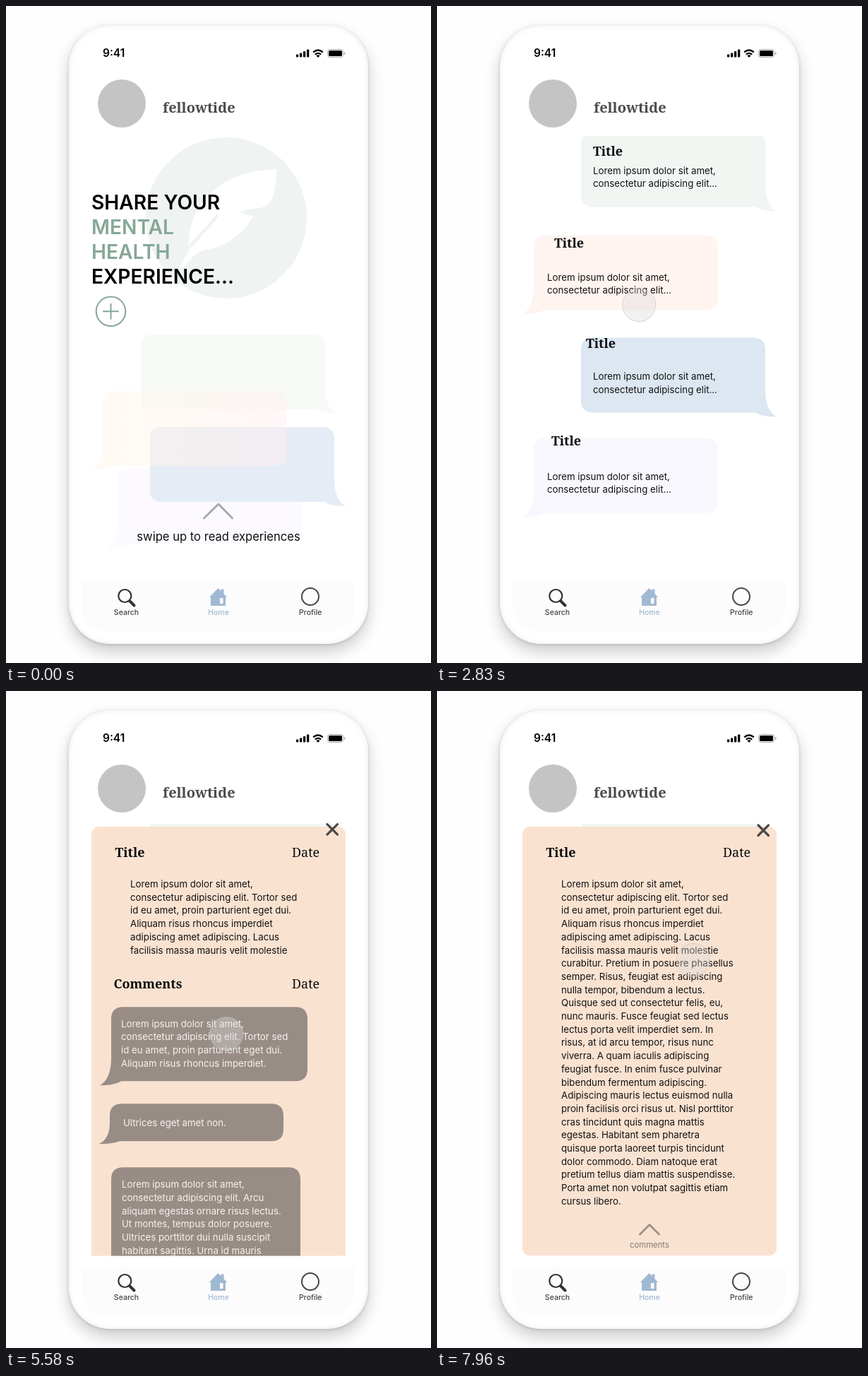
These frames come from a looping animation (602x930 px, 8000 ms). An HTML page:

```html
<!DOCTYPE html>
<html lang="en">
<head>
<meta charset="utf-8">
<title>Shared experiences</title>
<style>
  html, body { margin: 0; width: 100%; height: 100%; overflow: hidden; background: #fefefe; }
  .phone {
    position: absolute; left: 89px; top: 27px; width: 424px; height: 876px;
    border-radius: 58px; background: #fff;
    box-shadow: 0 11px 22px rgba(0,0,0,.2), 0 1px 4px rgba(0,0,0,.14),
      inset 0 0 8px rgba(0,0,0,.08);
  }
  svg { position: absolute; left: 0; top: 0; display: block; }
  text { font-family: Inter, "Open Sans", sans-serif; white-space: pre; }
  .body { font-size: 13.25px; fill: #111; }
  .light { fill: #f7f2ee; }
  .serif { font-family: "Noto Serif", serif; font-size: 18px; fill: #0c0c0c; }
  .bold { font-weight: 700; }
  .head { font-size: 28.2px; font-weight: 600; }
  .nav { font-size: 10.5px; font-weight: 500; text-anchor: middle; fill: #444; }
  .line { fill: none; stroke-linecap: round; stroke-linejoin: round; }
</style>
</head>
<body>
<div class="phone"></div>
<svg id="stage" width="602" height="930" viewBox="0 0 602 930"></svg>
<script>
const LOOP = 8000;
const GREEN = '#86a797', PEACH = '#fae2d1', BROWN = '#988d86', BLUE = '#a0b9d2';
const PITCH = 18.7;

const STORY = `Lorem ipsum dolor sit amet,
consectetur adipiscing elit. Tortor sed
id eu amet, proin parturient eget dui.
Aliquam risus rhoncus imperdiet
adipiscing amet adipiscing. Lacus
facilisis massa mauris velit molestie
curabitur. Pretium in posuere phasellus
semper. Risus, feugiat est adipiscing
nulla tempor, bibendum a lectus.
Quisque sed ut consectetur felis, eu,
nunc mauris. Fusce feugiat sed lectus
lectus porta velit imperdiet sem. In
risus, at id arcu tempor, risus nunc
viverra. A quam iaculis adipiscing
feugiat fusce. In enim fusce pulvinar
bibendum fermentum adipiscing.
Adipiscing mauris lectus euismod nulla
proin facilisis orci risus ut. Nisl porttitor
cras tincidunt quis magna mattis
egestas. Habitant sem pharetra
quisque porta laoreet turpis tincidunt
dolor commodo. Diam natoque erat
pretium tellus diam mattis suspendisse.
Porta amet non volutpat sagittis etiam
cursus libero.`;
const TEASER = 'Lorem ipsum dolor sit amet,\nconsectetur adipiscing elit...';
const REPLIES = [
  `Lorem ipsum dolor sit amet,
consectetur adipiscing elit. Tortor sed
id eu amet, proin parturient eget dui.
Aliquam risus rhoncus imperdiet.`,
  'Ultrices eget amet non.',
  `Lorem ipsum dolor sit amet,
consectetur adipiscing elit. Arcu
aliquam egestas ornare risus lectus.
Ut montes, tempus dolor posuere.
Ultrices porttitor dui nulla suscipit
habitant sagittis. Urna id mauris
volutpat enim nunc ut viverra
elementum, et. Nulla eget enim`
];

const text = (x, y, str, cls, extra = '') =>
  `<text x="${x}" y="${y}" class="${cls}" ${extra}>${str}</text>`;
const lines = (x, y, str, cls = 'body') =>
  str.split('\n').map((s, i) => text(x, y + i * PITCH, s, cls)).join('');
const stroke = (d, color, width, cap = 'round') =>
  `<path class="line" d="${d}" stroke="${color}" stroke-width="${width}" style="stroke-linecap:${cap}"/>`;
const rect = (x, y, w, h, fill, r = 0) =>
  `<rect x="${x}" y="${y}" width="${w}" height="${h}" rx="${r}" fill="${fill}"/>`;
const ring = (x, y, r, color, width) =>
  `<circle cx="${x}" cy="${y}" r="${r}" fill="none" stroke="${color}" stroke-width="${width}"/>`;
const plus = (x, y, r, arm, color, width) => ring(x, y, r, color, width) +
  stroke(`M${x - arm} ${y}h${2 * arm}M${x} ${y - arm}v${2 * arm}`, color, width);

// Speech bubble as one outline, its tail at the lower right or mirrored to the left.
function bubble(x, y, w, h, fill, left, tail = 32, drop = 6) {
  const r = 17;
  const d = `M${r} 0H${w - r}Q${w} 0 ${w} ${r}V${h - tail}
    C${w} ${h - tail * .45} ${w + 5} ${h} ${w + 16} ${h + drop}
    C${w + 5} ${h + drop} ${w - 6} ${h + drop - 1} ${w - 14} ${h}
    H${r}Q0 ${h} 0 ${h - r}V${r}Q0 0 ${r} 0Z`;
  const place = left ? `translate(${x + w} ${y}) scale(-1 1)` : `translate(${x} ${y})`;
  return `<path d="${d}" fill="${fill}" transform="${place}"/>`;
}

// from/to: left and top before and after the swipe, pale/fill: colour before and after,
// title/body: text offsets in the bubble.
const CARDS = [
  { from: [191, 465], to: [204, 349], pale: '#f7faf7', fill: '#f1f6f3', title: [17, 33], body: [17, 59] },
  { from: [158, 655], to: [137, 782], pale: '#fcfaff', fill: '#f9f7fe', title: [25, 10], body: [19, 59], left: true },
  { from: [204, 596], to: [204, 640], pale: '#e5ecf5', fill: '#dde7f1', title: [7, 14], body: [17, 59.5] },
  { from: [137, 545], to: [137, 495], pale: 'url(#blush)', fill: '#fff4f0', title: [29, 17], body: [19, 64], left: true }
];

const card = (c, i) => `<g id="card${i}">
  <g id="pale${i}">${bubble(0, 0, 261, 106, c.pale, c.left)}</g>
  <g id="full${i}">${bubble(0, 0, 261, 106, c.fill, c.left)}
    ${text(...c.title, 'Title', 'serif bold')}${lines(...c.body, TEASER)}</g></g>`;

const feather = `<circle cx="312" cy="300" r="114" fill="#eff3f2"/>
  <path fill="#fff" d="M383 231C384 262 376 280 366 284C355 288 345 286 331 292C339 295 345 297 350 298
    C335 323 312 340 288 344C278 346 272 348 266 354L251 371L246 369L259 346C255 300 284 234 383 231Z"/>` +
  stroke('M299 298L261 340', '#eff3f2', 4.5);

const home = ['SHARE YOUR', 'MENTAL', 'HEALTH', 'EXPERIENCE...'].map((s, i) =>
    text(121, 287.5 + i * 35.3, s, 'head', `fill="${i % 3 ? GREEN : '#000'}"`)).join('') +
  plus(148.5, 432.3, 20.8, 10.5, GREEN, 2) +
  stroke('M280.5 725L301 705L320.5 725', '#a9a9a9', 3) +
  text(301, 757, 'swipe up to read experiences', '', 'font-size="16.6" text-anchor="middle" fill="#111"');

const story = rect(121, 192, 360, 607.5, PEACH, 11) +
  text(154.5, 234.5, 'Title', 'serif bold') + text(405, 234.5, 'Date', 'serif') +
  lines(176, 278, STORY) +
  stroke('M287.5 769L301 755.5L314.5 769', '#a0938b', 3) +
  text(301, 788, 'comments', '', `font-size="11.3" text-anchor="middle" fill="#84786f"`) +
  `<g id="cross">${stroke('M455 190L469.5 204.5M469.5 190L455 204.5', '#4c4848', 3.2)}</g>`;

const comments = rect(121, 192, 360, 607.5, PEACH, 11) +
  text(152.5, 234.5, 'Comments', 'serif bold') + text(405, 234.5, 'Date', 'serif') +
  bubble(149, 261, 278, 105, BROWN, true) +
  bubble(147, 398, 246, 53, BROWN, true, 26, 4) +
  bubble(149, 488, 268, 185, BROWN, true, 66, 11) +
  lines(163, 289.3, REPLIES[0], 'body light') +
  lines(166, 429.8, REPLIES[1], 'body light') +
  lines(164, 517, REPLIES[2], 'body light') +
  plus(301.3, 722.5, 11.2, 5.5, '#a9bccd', 1.3) +
  stroke('M287.5 755.5L301 769L314.5 755.5', '#a0938b', 3);

const statusBar = text(137, 72, '9:41', '', 'font-size="15.5" font-weight="600"') +
  [4, 6, 8.5, 11].map((h, i) => rect(411 + i * 5, 72.5 - h, 3.3, h, '#000', .9)).join('') +
  stroke('M435.2 65.4Q442 59.6 448.8 65.4', '#000', 2.3, 'butt') +
  stroke('M437.8 68.6Q442 65 446.2 68.6', '#000', 2.2, 'butt') +
  '<path d="M439.4 70.3Q442 68.4 444.6 70.3L442 73Z"/>' +
  `<rect x="455.5" y="61.5" width="22" height="11" rx="3" fill="none" stroke="#a5a5a5"/>` +
  rect(457, 63, 19, 8, '#000', 1.6) + rect(479, 65, 1.4, 4, '#a5a5a5', .7);

const header = '<circle cx="164" cy="138" r="34" fill="#c4c4c4"/>' +
  text(222, 151, 'fellowtide', 'serif bold', 'style="font-size:20px;fill:#4c4a4d"');

const navBar = '<path d="M107 815H494V846Q494 885 455 885H146Q107 885 107 846Z" fill="#fcfcfc"/>' +
  ring(168.3, 835, 9, '#333', 2.2) + stroke('M175.5 842.5L181.5 848.5', '#333', 4) +
  `<path fill="${BLUE}" d="M288 837L300.5 824L304.5 828V825.5H308.5V832L313 837H311V849H290V837Z"/>` +
  rect(303, 838, 4.5, 8, '#fcfcfc') +
  ring(431, 836, 12, '#474747', 2) +
  text(170.5, 861.6, 'Search', 'nav') +
  text(301, 861.6, 'Home', 'nav', `style="fill:${BLUE}"`) +
  text(431.3, 861.6, 'Profile', 'nav');

const stage = document.getElementById('stage');
stage.innerHTML = `<defs>
    <clipPath id="pageClip"><rect id="pageBox" x="107" width="387"/></clipPath>
    <clipPath id="sheetClip"><rect id="sheetBox" x="121" y="187" width="360"/></clipPath>
    <linearGradient id="blush" x1="1" x2="0">
      <stop offset="0" stop-color="#fff8e8" stop-opacity=".5"/>
      <stop offset="1" stop-color="#ffeef0" stop-opacity=".5"/>
    </linearGradient>
  </defs>
  <g clip-path="url(#pageClip)">
    <g id="back">${feather}</g>${CARDS.map(card).join('')}<g id="home">${home}</g>
  </g>
  ${header}${navBar}
  <g clip-path="url(#sheetClip)"><g id="story">${story}</g><g id="comments">${comments}</g></g>
  ${statusBar}
  <circle id="touch" r="23.5" fill="rgba(217,217,217,.37)" stroke="rgba(200,200,200,.7)"/>`;

// Resting places of the touch point: time, x, y.
const TOUCH = [
  [500, 288, 536], [1000, 288, 536], [1500, 288, 435], [2670, 288, 435],
  [3170, 281, 387], [4250, 281, 387], [4720, 308, 645], [5000, 308, 645],
  [5918, 314, 415], [6420, 314, 415], [6830, 299, 303], [6870, 299, 303],
  [7550, 298, 660], [7750, 298, 660], [7960, 363, 381]
];

const el = id => document.getElementById(id);
const set = (id, attrs) => { for (const k in attrs) el(id).setAttribute(k, attrs[k]); };
const move = (id, x, y) => set(id, { transform: `translate(${x} ${y})` });
const part = (t, a, b) => Math.min(1, Math.max(0, (t - a) / (b - a)));
const smooth = p => p * p * (3 - 2 * p);
const mix = (a, b, p) => a + (b - a) * p;

function touchAt(t) {
  const i = TOUCH.findIndex(k => k[0] > t);
  if (i < 0) return TOUCH[TOUCH.length - 1].slice(1);
  if (i === 0) return TOUCH[0].slice(1);
  const [a, b] = [TOUCH[i - 1], TOUCH[i]];
  const p = smooth(part(t, a[0], b[0]));
  return [mix(a[1], b[1], p), mix(a[2], b[2], p)];
}

function draw(t) {
  const swipe = smooth(part(t, 1000, 1570));
  const glide = 170.5 * smooth(part(t, 1590, 1760));
  const scroll = 532 * swipe + glide;
  move('back', 0, -scroll);
  move('home', 0, -scroll);
  CARDS.forEach((c, i) => {
    move('card' + i, mix(c.from[0], c.to[0], swipe), mix(c.from[1], c.to[1], swipe) - glide);
    set('pale' + i, { opacity: 1 - swipe });
    set('full' + i, { opacity: swipe });
  });

  const rise = t < 3490 ? 620 : 600 * (1 - part(t, 3490, 4040)) ** 3;
  const top = rise > 0 ? 184 : 188;
  set('pageBox', { y: top, height: 815 - top });
  set('sheetBox', { height: 799.5 - .15 * rise - 187 });
  move('story', 0, rise);

  const open = smooth(part(t, 5000, 5918)) - smooth(part(t, 6870, 7550));
  move('comments', 0, 610 * (1 - open));
  move('cross', 0, -2 * open);

  const [x, y] = touchAt(t);
  set('touch', { cx: x, cy: y, opacity: part(t, 480, 580) });
}

function tick() {
  draw(performance.now() % LOOP);
  requestAnimationFrame(tick);
}
tick();
</script>
</body>
</html>
```
